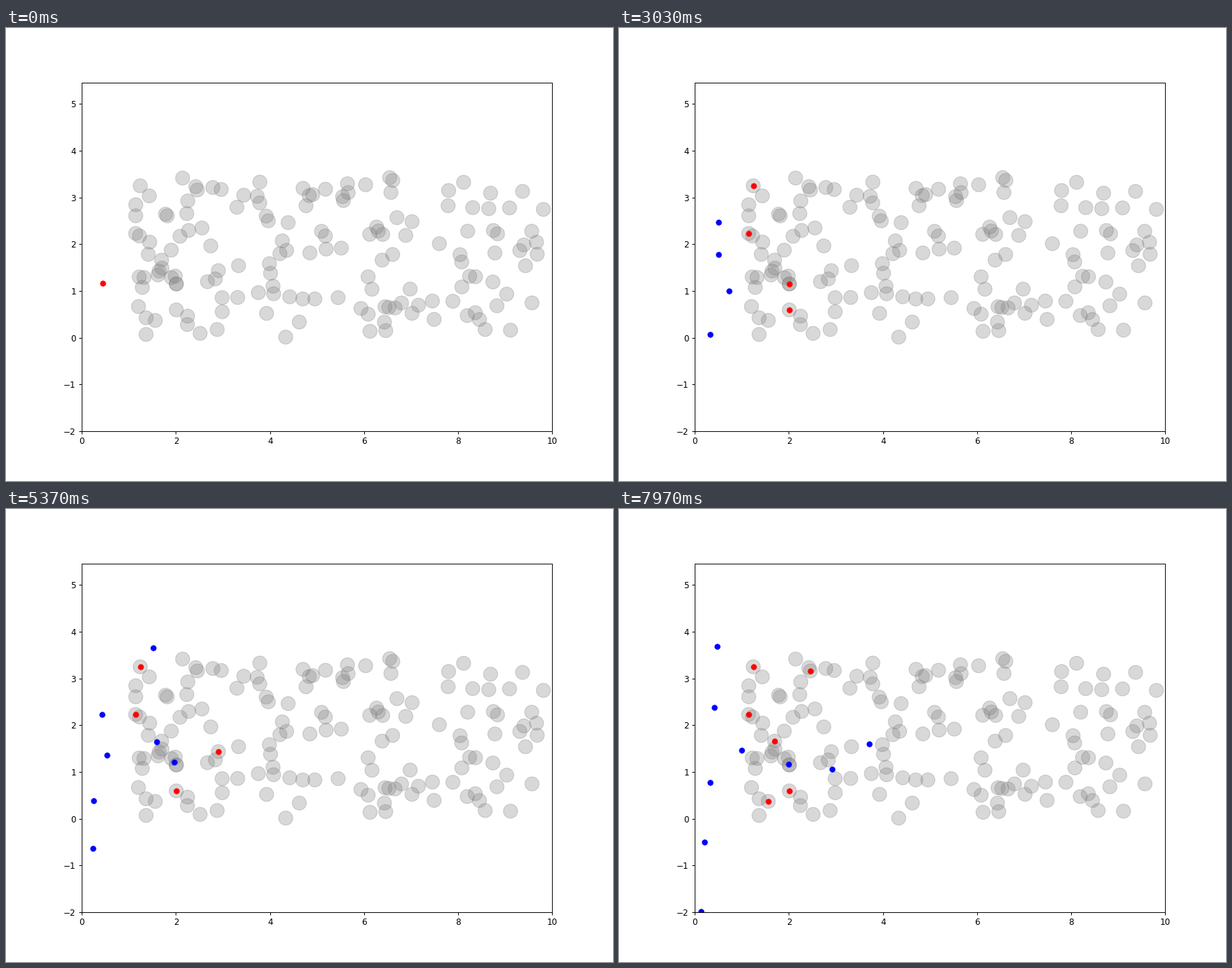
Animation, 866 px wide and 646 px high, one loop 8 s. Source, as a matplotlib script:

```python
import numpy as np
import matplotlib.pyplot as plt
from matplotlib.animation import FuncAnimation
from matplotlib.collections import PatchCollection
from matplotlib.patches import Circle

W, H, DPI = 866, 646, 86.6
FRAMES, LOOP = 240, 8000
LENGTH, WIDTH = 10, 2 * np.sqrt(3)  # channel size in data units
TRAP_COUNT, TRAP_RADIUS = 150, 0.15
HOP = 34  # frames a hop between two stops takes at most


def ease(s):
    return s * s * (3 - 2 * s)


class Hopper:
    """Enters at its first stop and hops on; stops are (frame, x, y) in pixels."""

    def __init__(self, *stops):
        self.birth = stops[0][0]
        self.hops = []
        for n, ((t0, *a), (t1, *b)) in enumerate(zip(stops, stops[1:])):
            leave = t0 if n == 0 else max(t0, t1 - HOP)
            self.hops.append((leave, t1, np.array(a), np.array(b)))

    def at(self, i):
        """Position and whether the particle moves."""
        leave, arrive, a, b = [h for h in self.hops if h[0] <= i or h is self.hops[0]][-1]
        s = min((i - leave) / (arrive - leave), 1)
        return a + (b - a) * ease(s), s < 1

    def traps(self):
        """Stops inside the channel where it stays for a while."""
        leaves = [h[0] for h in self.hops[1:]] + [FRAMES]
        return [h[3] for h, leave in zip(self.hops, leaves)
                if leave - h[1] > 5 and h[3][0] > 180]


class Sinker:
    """Slides along the left edge, ever faster towards the bottom."""

    birth = 27

    def at(self, i):
        u = (i - self.birth) / (FRAMES - self.birth)
        return np.array([136 - 19 * u, 424 + 151 * u * u]), True


hoppers = [
    Hopper((0, 138, 364), (30, 184, 368), (62, 243, 402)),
    Hopper((5, 148, 290), (22, 174, 214), (30, 191.5, 225)),
    Hopper((13, 140, 310), (42, 185, 293)),
    Hopper((45, 140, 350), (85, 243, 365), (156, 303, 346), (FRAMES, 357, 335)),
    Hopper((62, 133, 312), (144, 167, 183), (178, 252, 214), (232, 273, 231)),
    Hopper((76, 143, 326), (150, 134, 292), (182, 145, 296), (212, 144, 235),
           (FRAMES, 140, 196)),
    Hopper((74, 138, 380), (130, 236, 356), (178, 243, 365), (FRAMES, 304, 371)),
    Hopper((104, 120, 345), (172, 222, 331)),
    Hopper((129, 117, 370), (182, 130, 441), (FRAMES, 122, 475)),
    Hopper((153, 135, 350), (184, 190, 355), (FRAMES, 242, 364)),
    Hopper((162, 132, 385), (200, 213, 417)),
    Hopper((172, 128, 345), (210, 133, 382), (FRAMES, 130, 390)),
    Hopper((196, 139, 306), (FRAMES, 136, 283)),
    Hopper((206, 152, 326), (FRAMES, 175, 344)),
]
particles = hoppers + [Sinker()]
births = {p.birth for p in particles}

fig, ax = plt.subplots(figsize=(W / DPI, H / DPI), dpi=DPI)
ax.set_xlim(0, LENGTH)
ax.set_ylim(-2, WIDTH + 2)
to_data = ax.transData.inverted()


def data(points):
    p = np.reshape(points, (-1, 2)).astype(float)
    return to_data.transform(np.column_stack([p[:, 0], H - p[:, 1]]))


rng = np.random.default_rng(7)
used = data([t for h in hoppers for t in h.traps()])
spread = rng.uniform([1.1, 0], [LENGTH - TRAP_RADIUS, WIDTH],
                     (TRAP_COUNT - len(used), 2))
ax.add_collection(PatchCollection(
    [Circle(c, TRAP_RADIUS) for c in np.vstack([used, spread])],
    color="gray", alpha=0.3), autolim=False)
moving, = ax.plot([], [], "bo")
resting, = ax.plot([], [], "ro")


def draw(i):
    active, still = [], []
    for p in particles:
        if i >= p.birth:
            pos, moves = p.at(i)
            # Everything is at rest at the moment a new particle enters.
            (active if moves and i not in births else still).append(pos)
    for line, pts in ((moving, active), (resting, still)):
        line.set_data(*data(pts).T)
    return moving, resting


anim = FuncAnimation(fig, draw, frames=FRAMES, interval=LOOP / FRAMES,
                     init_func=lambda: draw(0), repeat=True, repeat_delay=0)
plt.show()
```
